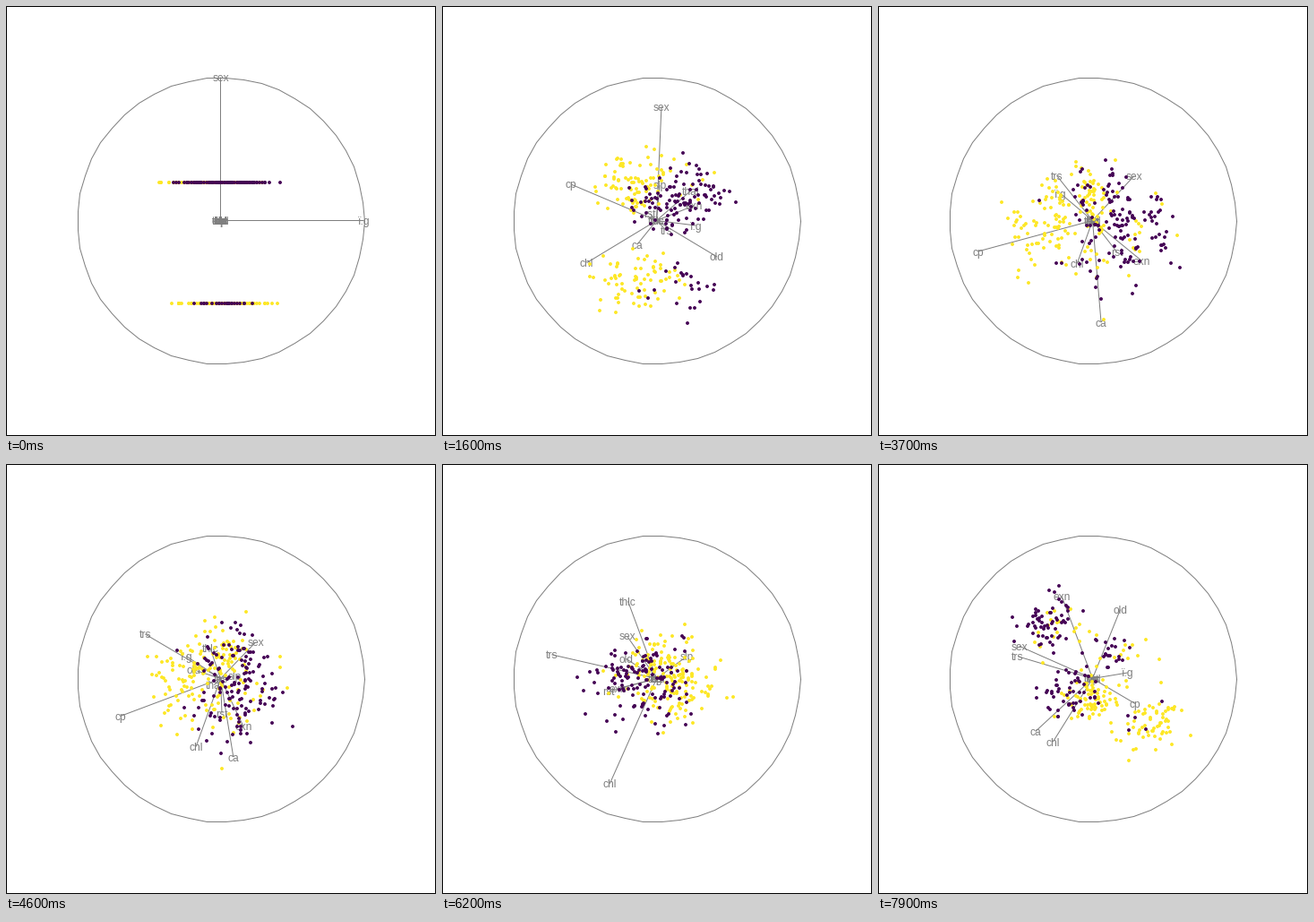
These frames come from a looping animation (480 by 480 pixels, 8 s). A matplotlib script:

```python
import numpy as np
import matplotlib.pyplot as plt
from matplotlib.animation import FuncAnimation
from matplotlib.collections import LineCollection
from matplotlib.patches import Rectangle

SIZE, DPI, PX = 480, 100, 0.72  # PX: points per pixel
MID, RADIUS, SCALE = 239.5, 160, 135
FRAMES, INTERVAL = 80, 100
GREY, YELLOW, PURPLE = "#7f7f7f", "#fde725", "#440154"

VARS = "age sex cp trs chl fbs rst thlc exn old slp ca thal".split()

# Main axis directions the tour passes through; the others rest at zero.
POSES = {
    0: dict(age=(1, 0), sex=(0, 1)),
    24: dict(sex=(.07, .70), cp=(-.70, .23), chl=(-.42, -.35), ca=(-.09, -.33),
             old=(.36, -.27), exn=(.30, .03), thal=(.19, .20), slp=(.01, .25)),
    37: dict(cp=(-.78, -.19), sex=(.28, .29), trs=(-.25, .30), age=(-.22, .18),
             chl=(-.10, -.28), exn=(.34, -.27), ca=(.07, -.67), rst=(.17, -.21)),
    62: dict(thlc=(-.19, .51), trs=(-.72, .15), sex=(-.20, .28), slp=(.21, .15),
             old=(-.21, .13), rst=(-.33, -.09), chl=(-.33, -.70), exn=(-.27, -.07)),
    79: dict(exn=(-.21, .56), old=(.19, .47), sex=(-.50, .22), trs=(-.51, .15),
             age=(.24, .04), cp=(.29, -.17), ca=(-.39, -.36), chl=(-.27, -.43)),
}

# Steps of each scale (0: continuous) and its mean for well and ill.
TRAITS = dict(cp=(3, .46, .16), trs=(0, .33, .38), chl=(0, .27, .29),
              fbs=(1, .14, .16), rst=(2, .30, .22), thlc=(0, .67, .52),
              exn=(1, .14, .55), old=(0, .09, .26), slp=(2, .80, .58),
              ca=(4, .07, .28), thal=(3, .70, .85))

# count, sex, ill, youngest, oldest
GROUPS = [(93, 1, 0, 29, 70), (72, 0, 0, 34, 76),
          (114, 1, 1, 35, 77), (24, 0, 1, 43, 66)]

rng = np.random.default_rng(5)


def sample(n, steps, mean):
    level = np.clip(rng.normal(mean, 0.14, n), 0, 1)
    if not steps:
        return level
    return np.minimum(np.floor(level * steps + rng.random(n)), steps) / steps


def people(n, sex, ill, young, old):
    age = rng.triangular(young, (young + old) / 2 + 1, old, n).round()
    age[:2] = young, old
    traits = [sample(n, t[0], t[1 + ill]) for t in TRAITS.values()]
    return np.column_stack([(age - 29) / 48, np.full(n, sex), *traits])


def as_matrix(pose):
    return np.array([pose.get(v, (0, 0)) for v in VARS], float)


TIMES = np.array(list(POSES), float)
KEYS = np.array([as_matrix(p) for p in POSES.values()])
SPEED = np.gradient(KEYS, TIMES, axis=0, edge_order=2)


def basis(i):
    """Hermite path through the poses, made orthonormal."""
    k = min(np.searchsorted(TIMES, i, side="right") - 1, len(TIMES) - 2)
    h = TIMES[k + 1] - TIMES[k]
    u = (i - TIMES[k]) / h
    a = (KEYS[k] * (1 + 2 * u) * (1 - u) ** 2 + KEYS[k + 1] * u * u * (3 - 2 * u)
         + h * SPEED[k] * u * (1 - u) ** 2 + h * SPEED[k + 1] * u * u * (u - 1))
    left, _, right = np.linalg.svd(a, full_matrices=False)
    return left @ right


data = np.vstack([people(*g) for g in GROUPS])
data -= data.mean(axis=0)
colours = [PURPLE if g[2] else YELLOW for g in GROUPS for _ in range(g[0])]

fig = plt.figure(figsize=(SIZE / DPI, SIZE / DPI), dpi=DPI, facecolor="white")
ax = fig.add_axes([0, 0, 1, 1])
ax.set(xlim=(0, SIZE), ylim=(SIZE, 0))
ax.axis("off")

ax.add_patch(Rectangle((0.5, 0.5), SIZE - 1, SIZE - 1, fill=False,
                       ec="black", lw=PX, snap=False))
theta = np.linspace(0, 2 * np.pi, 50)
ax.plot(np.floor(240 + RADIUS * np.cos(theta)) + 0.5,
        np.floor(240 - RADIUS * np.sin(theta)) + 0.5,
        color=GREY, lw=PX, snap=False, zorder=1)
spokes = LineCollection([], colors=GREY, linewidths=PX, snap=False, zorder=2)
ax.add_collection(spokes)
labels = [ax.text(MID, MID, "ï.g" if v == "age" else v, color=GREY,
                  family="Liberation Sans", size=12 * PX, ha="center",
                  va="baseline", zorder=3) for v in VARS]
dots = ax.scatter(data[:, 0], data[:, 1], s=(3.9 * PX) ** 2, c=colours,
                  linewidths=0, snap=False, zorder=4)


def draw(i):
    a = basis(i) * (1, -1)
    ends = MID + RADIUS * a
    spokes.set_segments([[(MID, MID), e] for e in ends])
    for label, (x, y) in zip(labels, ends):
        label.set_position((x, y + 4.5))
    dots.set_offsets(np.round(240 + SCALE * (data @ a)))
    return [spokes, dots, *labels]


anim = FuncAnimation(fig, draw, frames=FRAMES, interval=INTERVAL,
                     init_func=lambda: draw(0), repeat=True, repeat_delay=0)
plt.show()
```
